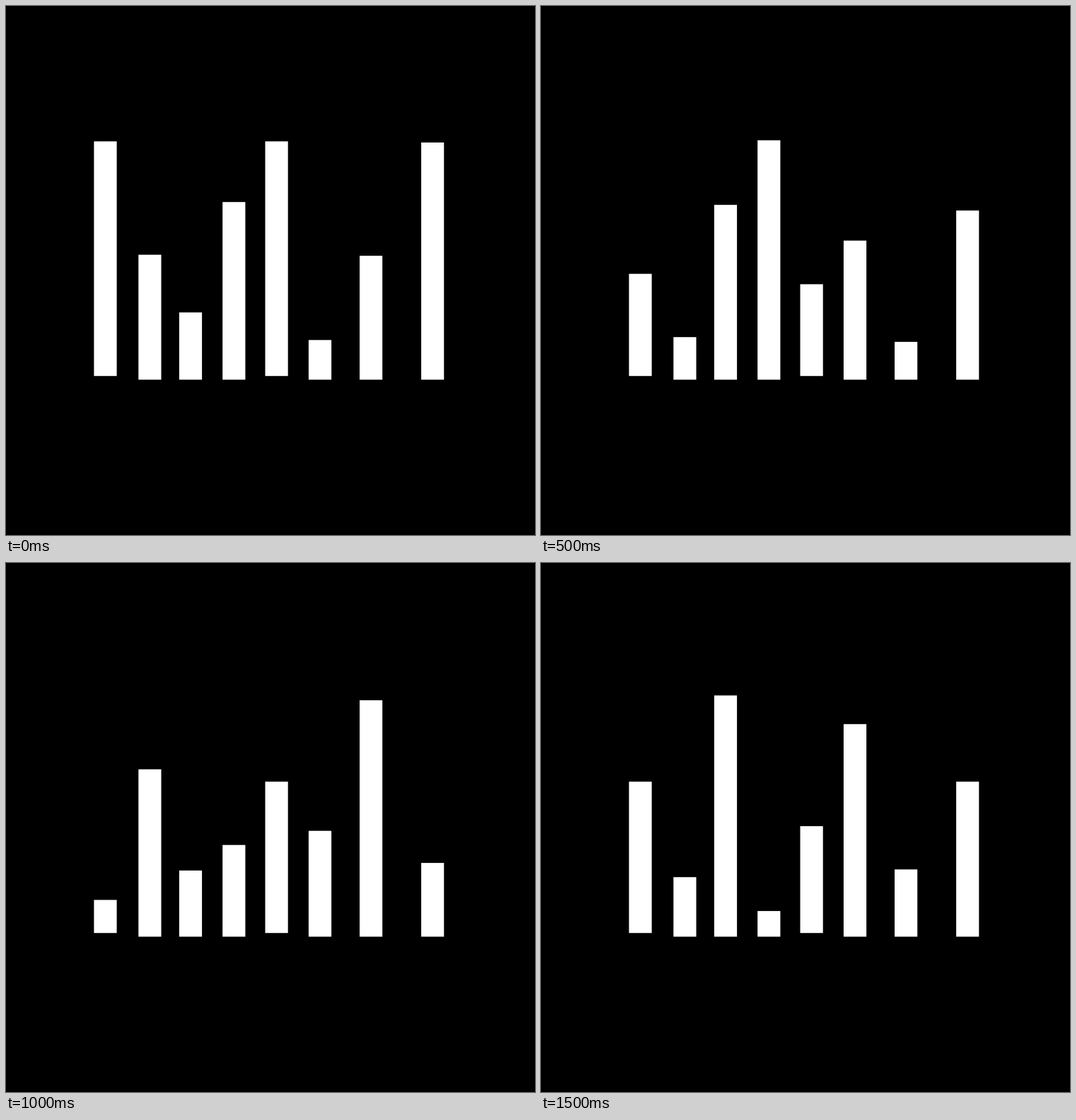
Write an HTML page that moves like this. It is 748 px wide and 748 px high and loops after 2000 ms.

```html
<!DOCTYPE html>
<html lang="en">
<head>
<meta charset="utf-8">
<title>Equalizer bars</title>
<style>
  html, body { margin: 0; width: 100%; height: 100%; overflow: hidden; background: #000; }
  svg { display: block; width: 100vw; height: 100vh; }
</style>
</head>
<body>
<svg id="stage" viewBox="0 0 748 748" fill="#fff"></svg>
<script>
  const STEP = 500;
  const WIDTH = 32.2;

  // left edge, bottom edge, top edge at each step
  const BARS = [
    { x: 124.4, bottom: 523.2, tops: [191.4, 378.7, 476.4, 309.2] },
    { x: 187.3, bottom: 528.4, tops: [351.7, 468.2, 291.7, 444.2] },
    { x: 244.9, bottom: 528.4, tops: [433.3, 281.2, 434.8, 187.3] },
    { x: 306.2, bottom: 528.4, tops: [277.2, 189.9, 398.7, 492.1] },
    { x: 366.5, bottom: 523.2, tops: [191.4, 393.4, 309.2, 372.1] },
    { x: 427.9, bottom: 528.4, tops: [472.3, 331.7, 378.7, 227.8] },
    { x: 500.0, bottom: 528.4, tops: [353.2, 474.9, 194.1, 433.3] },
    { x: 587.1, bottom: 528.4, tops: [193.0, 289.2, 424.1, 309.2] }
  ];

  const stage = document.getElementById("stage");
  const rects = BARS.map(({ x }) => {
    const rect = document.createElementNS("http://www.w3.org/2000/svg", "rect");
    rect.setAttribute("x", x);
    rect.setAttribute("width", WIDTH);
    return stage.appendChild(rect);
  });

  let shown = -1;

  function draw(step) {
    if (step === shown) return;
    shown = step;
    BARS.forEach(({ bottom, tops }, i) => {
      rects[i].setAttribute("y", tops[step]);
      rects[i].setAttribute("height", bottom - tops[step]);
    });
  }

  const start = performance.now();

  function tick() {
    const elapsed = performance.now() - start;
    draw(Math.floor(elapsed / STEP) % 4);
    requestAnimationFrame(tick);
  }

  tick();
</script>
</body>
</html>
```
